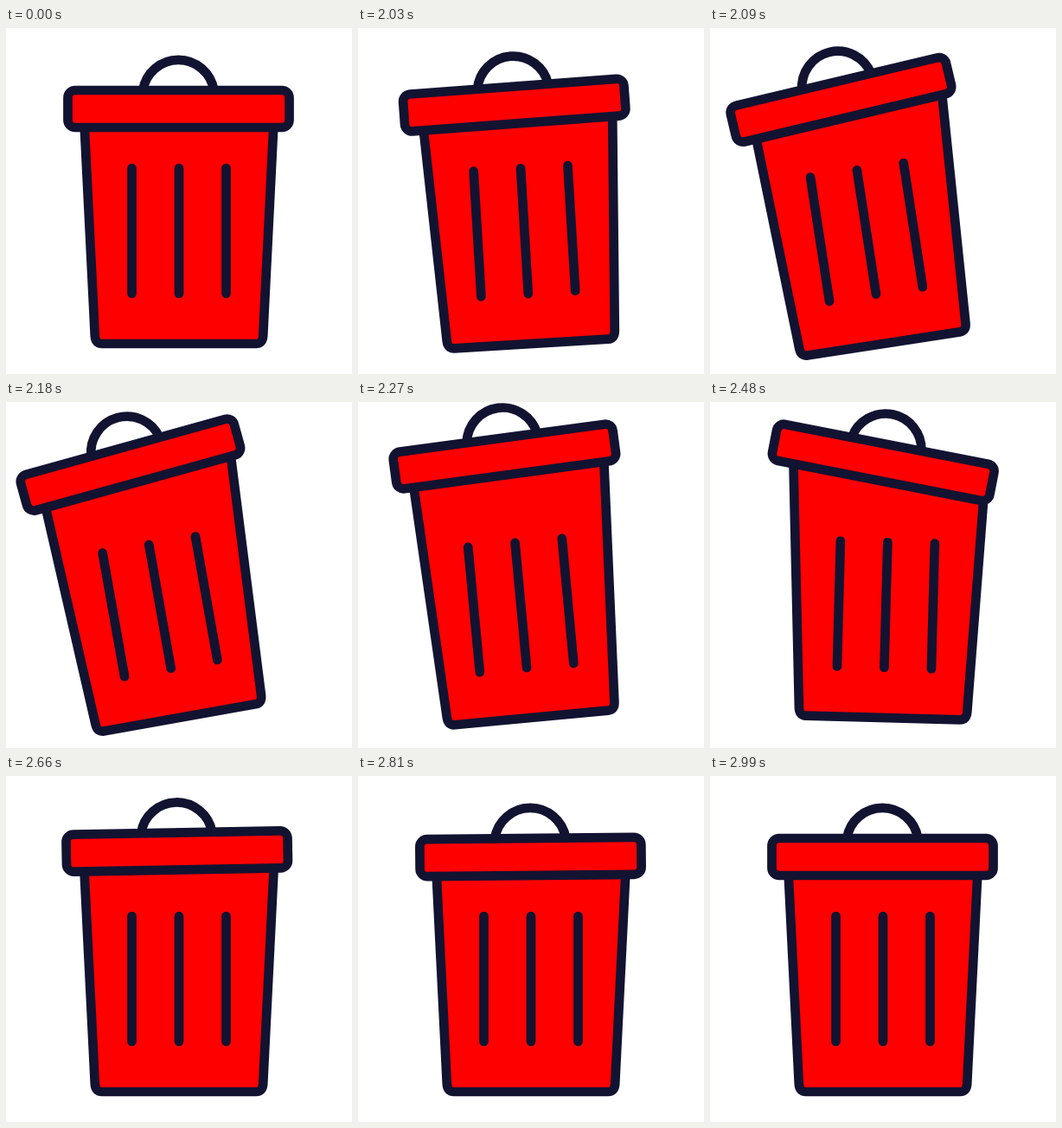
Write an HTML page that moves like this. It is 400 px wide and 400 px high and loops after 3.08 s.

```html
<!DOCTYPE html>
<html lang="en">
<head>
<meta charset="utf-8">
<title>Trash can</title>
<style>
  html, body { margin: 0; width: 100%; height: 100%; overflow: hidden; background: #fff; }
  svg { display: block; width: 100%; height: 100%; }
</style>
</head>
<body>
<svg viewBox="0 0 400 400" fill="#f00" stroke="#121331" stroke-width="10.7" stroke-linecap="round" stroke-linejoin="round">
  <g id="can">
    <path d="M88.7 74 L102.8 356 Q103.3 365 111 365 H289 Q296.7 365 297.2 356 L311.3 74 Z"/>
    <path d="M145.5 162 V307 M200 162 V307 M254.5 162 V307"/>
    <g id="lid">
      <path fill="none" d="M158.3 72 A41.5 41.5 0 0 1 240.3 72"/>
      <rect x="71.5" y="72" width="256" height="43" rx="8.5"/>
    </g>
  </g>
</svg>
<script>
const LOOP = 3080, START = 2000, STEP = 30, LAST = 33;

const can = document.getElementById('can');
const lid = document.getElementById('lid');

const clamp = (x, low, high) => Math.max(low, Math.min(high, x));

function draw(time) {
  const step = clamp(Math.floor((time % LOOP - START) / STEP), 0, LAST);
  const progress = (from, to) => clamp((step - from) / (to - from), 0, 1);
  // Both run from 0 to 1: burst starts fast, swing eases at both ends.
  const burst = end => Math.sin(progress(0, end) * Math.PI / 2);
  const swing = (from, to) => (1 - Math.cos(progress(from, to) * Math.PI)) / 2;

  // The can leans left, swings right and settles.
  const tilt = -10.1 * burst(4.5) + 15.4 * swing(6.9, 12.5) - 5.3 * swing(12.5, 18);

  // The lid jumps, tips the other way and drops back on.
  const x = -5.5 * burst(3.5) + 3.3 * swing(3.5, 9.5) - 4.9 * swing(9.5, 16) + 7.1 * swing(16, 25);
  const y = -32.5 * burst(10) + 32.5 * swing(10, 27);
  const turn = -5.4 * swing(0, 4) + 14.9 * swing(6, 16) - 10.5 * swing(16, 22) + swing(22, LAST);

  can.setAttribute('transform', `rotate(${tilt} 200 360)`);
  lid.setAttribute('transform', `translate(${x} ${y}) rotate(${turn} 199.5 93.5)`);
}

const begin = performance.now();
function tick() {
  draw(performance.now() - begin);
  requestAnimationFrame(tick);
}
tick();
</script>
</body>
</html>
```
